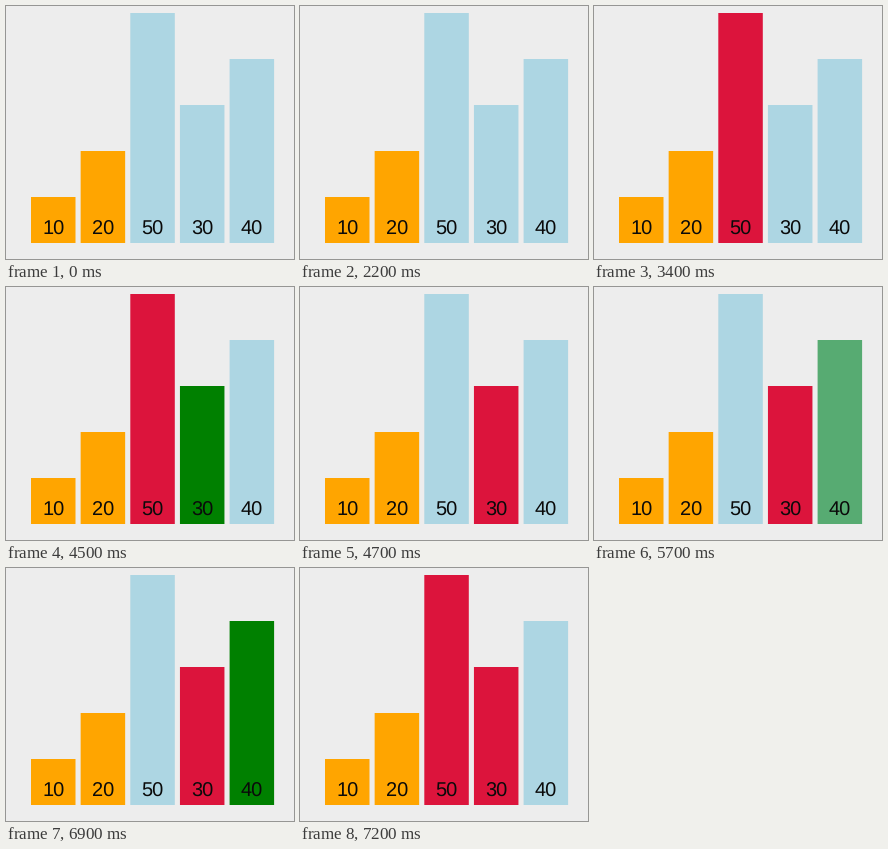
A matplotlib script that plays this animation: 288 px wide and 253 px high, repeating every 8 s.

```python
import matplotlib.pyplot as plt
import numpy as np
from matplotlib.animation import FuncAnimation
from matplotlib.colors import to_rgb
from matplotlib.patches import Rectangle

W, H, DPI = 288, 253, 64
STEP, LOOP, FADE = 100, 8000, 200

BG = "#ededed"
IDLE, SORTED, MIN, SCAN = "#add6e3", "#ffa500", "#dc143c", "#008000"

VALUES = [10, 20, 50, 30, 40]
START = [SORTED, SORTED, IDLE, IDLE, IDLE]
LEFT, PITCH, BAR_W, BASE, UNIT = 25, 49.65, 44.5, 237, 4.6

# (start in ms, {bar: new colour}): one selection-sort pass
EVENTS = [
    (2200, {2: MIN}),
    (3400, {3: SCAN}),
    (4500, {2: IDLE, 3: MIN}),
    (5600, {4: SCAN}),
    (6900, {2: MIN, 4: IDLE}),
]

plt.rcParams["font.family"] = "Liberation Sans"
plt.rcParams["text.hinting"] = "none"

fig = plt.figure(figsize=(W / DPI, H / DPI), dpi=DPI, facecolor=BG)
ax = fig.add_axes([0, 0, 1, 1])
ax.set_xlim(0, W)
ax.set_ylim(H, 0)
ax.axis("off")


def px(size):
    return size * 72 / DPI


def make_bar(i, value):
    x = LEFT + i * PITCH
    height = value * UNIT
    bar = Rectangle((x, BASE - height), BAR_W, height, lw=0, fc=START[i], snap=False)
    ax.add_patch(bar)
    ax.text(x + BAR_W / 2, 229, str(value), fontsize=px(20), color="#0a0a0a",
            ha="center", va="baseline")
    return bar


bars = [make_bar(i, v) for i, v in enumerate(VALUES)]


def ease(t):
    t = min(max(t, 0), 1)
    return t * t * (3 - 2 * t)


def update(frame):
    now = frame * STEP
    colors = [np.array(to_rgb(c)) for c in START]
    for start, changes in EVENTS:
        k = ease((now - start) / FADE)
        for i, color in changes.items():
            colors[i] = colors[i] * (1 - k) + np.array(to_rgb(color)) * k
    for bar, color in zip(bars, colors):
        bar.set_facecolor(tuple(color))
    return bars


anim = FuncAnimation(fig, update, frames=LOOP // STEP, interval=STEP,
                     repeat=True, repeat_delay=0, blit=False)
plt.show()
```
